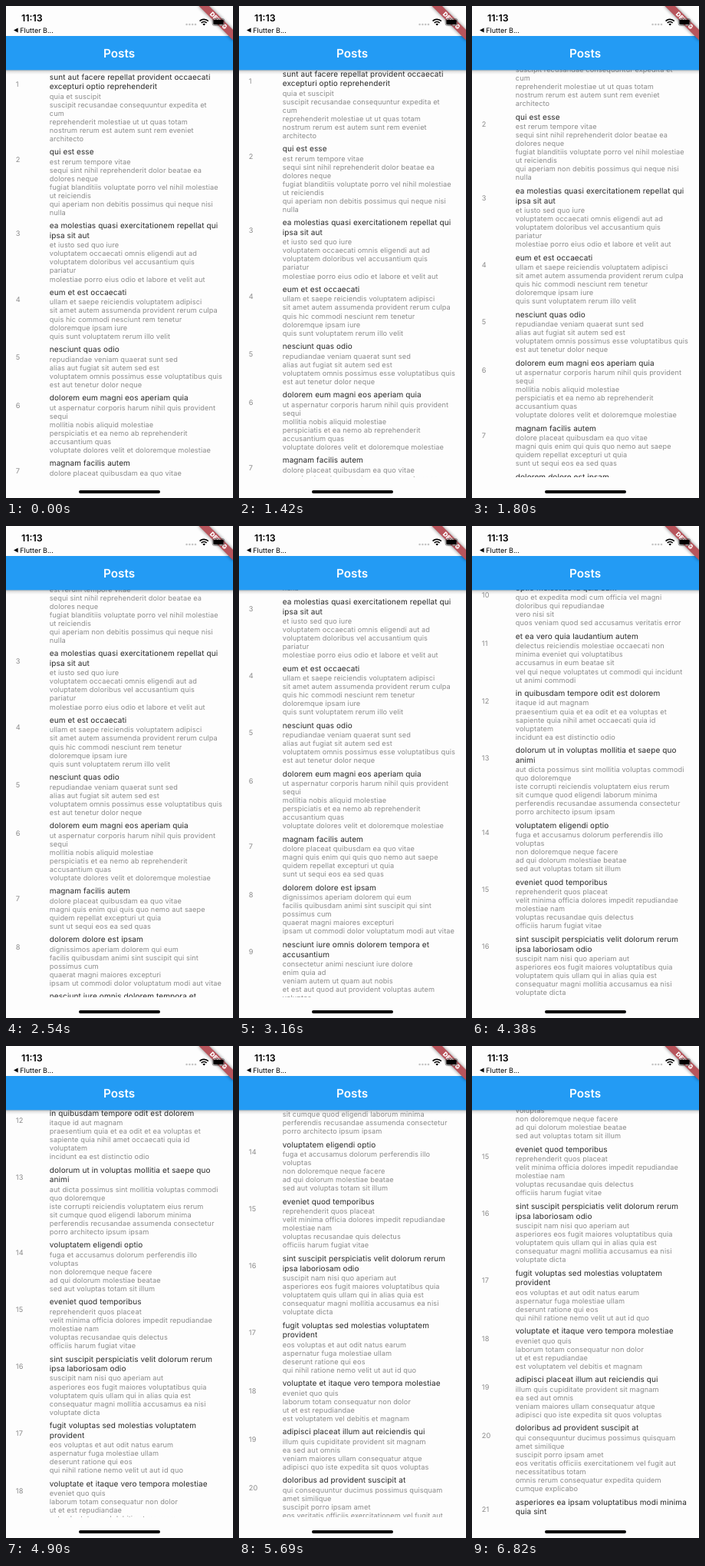
An HTML page for the animation above (8 s loop, 296 by 640 pixels).

```html
<!DOCTYPE html>
<html lang="en">
<head>
<meta charset="utf-8">
<title>Posts</title>
<style>
  html, body { margin: 0; width: 100%; height: 100%; overflow: hidden; background: #fdfdfd; }
  svg {
    display: block; width: 296px; height: 640px;
    font-family: Inter, Roboto, sans-serif; text-rendering: geometricPrecision;
  }
  .title { font-size: 10px; letter-spacing: .1px; fill: #2a2a2a; }
  .body { font-size: 9.2px; letter-spacing: .1px; fill: #8b8b8b; }
</style>
</head>
<body>
<svg viewBox="0 0 296 640" xmlns="http://www.w3.org/2000/svg">
  <defs>
    <clipPath id="viewport"><rect y="83" width="296" height="530"/></clipPath>
    <linearGradient id="shade" x2="0" y2="1">
      <stop offset="0" stop-color="#000" stop-opacity=".3"/>
      <stop offset=".4" stop-color="#000" stop-opacity=".1"/>
      <stop offset="1" stop-color="#000" stop-opacity="0"/>
    </linearGradient>
    <filter id="blur" x="-20%" y="-100%" width="140%" height="300%"><feGaussianBlur stdDeviation="2"/></filter>
  </defs>
  <rect width="296" height="640" fill="#fdfdfd"/>

  <g clip-path="url(#viewport)"><g id="list"></g></g>

  <rect y="83" width="296" height="6" fill="url(#shade)"/>
  <rect y="39" width="296" height="44.3" fill="#239bf4"/>
  <text x="147.5" y="67.3" font-size="15.3" font-weight="600" fill="#fff" text-anchor="middle">Posts</text>

  <g transform="translate(296) rotate(45)">
    <rect x="-32" y="22" width="64" height="9.5" opacity=".5" filter="url(#blur)"/>
    <rect x="-32" y="22" width="64" height="9.5" fill="#b8555c"/>
    <text y="29.6" font-size="8" font-weight="900" fill="#fff" text-anchor="middle">DEBUG</text>
  </g>

  <text x="20" y="20.4" font-size="12.4" font-weight="600">11:13</text>
  <path d="M10 31.5l5.6-3v6z"/>
  <text x="18.3" y="34.8" font-size="9">Flutter B...</text>
  <g fill="#c4c4c4">
    <circle cx="235.6" cy="24" r="1.3"/><circle cx="239.4" cy="24" r="1.3"/>
    <circle cx="243.2" cy="24" r="1.3"/><circle cx="247" cy="24" r="1.3"/>
  </g>
  <g fill="none" stroke="#000" stroke-width="1.7">
    <path d="M252.6 19.6a8 8 0 0 1 11.2 0M254.7 22a5 5 0 0 1 7 0"/>
    <path d="M258.2 25.6l-1.8-1.9a2.6 2.6 0 0 1 3.6 0z" fill="#000" stroke="none"/>
  </g>
  <rect x="269.2" y="16.6" width="15.6" height="8.8" rx="2.3" fill="none" stroke="#555" stroke-width=".7"/>
  <rect x="270.3" y="17.7" width="13.4" height="6.6" rx="1.4"/>
  <rect x="95" y="630" width="106" height="4" rx="2"/>
</svg>

<script>
// Blank lines separate posts; "# " marks title lines.
const POSTS = `
# sunt aut facere repellat provident occaecati
# excepturi optio reprehenderit
quia et suscipit
suscipit recusandae consequuntur expedita et
cum
reprehenderit molestiae ut ut quas totam
nostrum rerum est autem sunt rem eveniet
architecto

# qui est esse
est rerum tempore vitae
sequi sint nihil reprehenderit dolor beatae ea
dolores neque
fugiat blanditiis voluptate porro vel nihil molestiae
ut reiciendis
qui aperiam non debitis possimus qui neque nisi
nulla

# ea molestias quasi exercitationem repellat qui
# ipsa sit aut
et iusto sed quo iure
voluptatem occaecati omnis eligendi aut ad
voluptatem doloribus vel accusantium quis
pariatur
molestiae porro eius odio et labore et velit aut

# eum et est occaecati
ullam et saepe reiciendis voluptatem adipisci
sit amet autem assumenda provident rerum culpa
quis hic commodi nesciunt rem tenetur
doloremque ipsam iure
quis sunt voluptatem rerum illo velit

# nesciunt quas odio
repudiandae veniam quaerat sunt sed
alias aut fugiat sit autem sed est
voluptatem omnis possimus esse voluptatibus quis
est aut tenetur dolor neque

# dolorem eum magni eos aperiam quia
ut aspernatur corporis harum nihil quis provident
sequi
mollitia nobis aliquid molestiae
perspiciatis et ea nemo ab reprehenderit
accusantium quas
voluptate dolores velit et doloremque molestiae

# magnam facilis autem
dolore placeat quibusdam ea quo vitae
magni quis enim qui quis quo nemo aut saepe
quidem repellat excepturi ut quia
sunt ut sequi eos ea sed quas

# dolorem dolore est ipsam
dignissimos aperiam dolorem qui eum
facilis quibusdam animi sint suscipit qui sint
possimus cum
quaerat magni maiores excepturi
ipsam ut commodi dolor voluptatum modi aut vitae

# nesciunt iure omnis dolorem tempora et
# accusantium
consectetur animi nesciunt iure dolore
enim quia ad
veniam autem ut quam aut nobis
et est aut quod aut provident voluptas autem
voluptas

# optio molestias id quia eum
quo et expedita modi cum officia vel magni
doloribus qui repudiandae
vero nisi sit
quos veniam quod sed accusamus veritatis error

# et ea vero quia laudantium autem
delectus reiciendis molestiae occaecati non
minima eveniet qui voluptatibus
accusamus in eum beatae sit
vel qui neque voluptates ut commodi qui incidunt
ut animi commodi

# in quibusdam tempore odit est dolorem
itaque id aut magnam
praesentium quia et ea odit et ea voluptas et
sapiente quia nihil amet occaecati quia id
voluptatem
incidunt ea est distinctio odio

# dolorum ut in voluptas mollitia et saepe quo
# animi
aut dicta possimus sint mollitia voluptas commodi
quo doloremque
iste corrupti reiciendis voluptatem eius rerum
sit cumque quod eligendi laborum minima
perferendis recusandae assumenda consectetur
porro architecto ipsum ipsam

# voluptatem eligendi optio
fuga et accusamus dolorum perferendis illo
voluptas
non doloremque neque facere
ad qui dolorum molestiae beatae
sed aut voluptas totam sit illum

# eveniet quod temporibus
reprehenderit quos placeat
velit minima officia dolores impedit repudiandae
molestiae nam
voluptas recusandae quis delectus
officiis harum fugiat vitae

# sint suscipit perspiciatis velit dolorum rerum
# ipsa laboriosam odio
suscipit nam nisi quo aperiam aut
asperiores eos fugit maiores voluptatibus quia
voluptatem quis ullam qui in alias quia est
consequatur magni mollitia accusamus ea nisi
voluptate dicta

# fugit voluptas sed molestias voluptatem
# provident
eos voluptas et aut odit natus earum
aspernatur fuga molestiae ullam
deserunt ratione qui eos
qui nihil ratione nemo velit ut aut id quo

# voluptate et itaque vero tempora molestiae
eveniet quo quis
laborum totam consequatur non dolor
ut et est repudiandae
est voluptatem vel debitis et magnam

# adipisci placeat illum aut reiciendis qui
illum quis cupiditate provident sit magnam
ea sed aut omnis
veniam maiores ullam consequatur atque
adipisci quo iste expedita sit quos voluptas

# doloribus ad provident suscipit at
qui consequuntur ducimus possimus quisquam
amet similique
suscipit porro ipsam amet
eos veritatis officiis exercitationem vel fugit aut
necessitatibus totam
omnis rerum consequatur expedita quidem
cumque explicabo

# asperiores ea ipsam voluptatibus modi minima
# quia sint`;

const LOOP = 8000;
const LIST_TOP = 83, PADDING = 3.15, TITLE_LINE = 12.61, BODY_LINE = 11.03;

// The screen refreshes in steps: [time in ms, scroll offset in px].
const SCROLL = [
  [0, 0], [1420, 4], [1530, 14], [1670, 29], [1800, 45.5], [1910, 60],
  [2030, 76], [2180, 93], [2540, 120], [2810, 142], [2980, 163], [3160, 187.5],
  [3390, 242], [3590, 318], [3740, 382], [3940, 436.5], [4110, 540], [4240, 650],
  [4380, 738], [4570, 815], [4900, 868.5], [5060, 894], [5220, 925], [5430, 963],
  [5690, 999], [5940, 1038], [6240, 1040], [6570, 1052], [6820, 1067]
];

const list = document.getElementById("list");

function addText(x, y, className, content) {
  const node = document.createElementNS("http://www.w3.org/2000/svg", "text");
  node.setAttribute("x", x);
  node.setAttribute("y", y.toFixed(2));
  node.setAttribute("class", className);
  node.textContent = content;
  list.append(node);
}

function buildList() {
  let y = LIST_TOP;
  POSTS.trim().split("\n\n").forEach((post, index) => {
    addText(12.8, y + 22, "body", index + 1);
    y += PADDING;
    for (const line of post.split("\n")) {
      if (line.startsWith("# ")) {
        addText(56.8, y + 9.5, "title", line.slice(2));
        y += TITLE_LINE;
      } else {
        addText(56.8, y + 9.2, "body", line);
        y += BODY_LINE;
      }
    }
    y += PADDING;
  });
}

function render(time) {
  const [, offset] = SCROLL.findLast(([start]) => start <= time);
  list.setAttribute("transform", `translate(0 ${-offset})`);
}

function tick() {
  render(performance.now() % LOOP);
  requestAnimationFrame(tick);
}

buildList();
tick();
</script>
</body>
</html>
```
